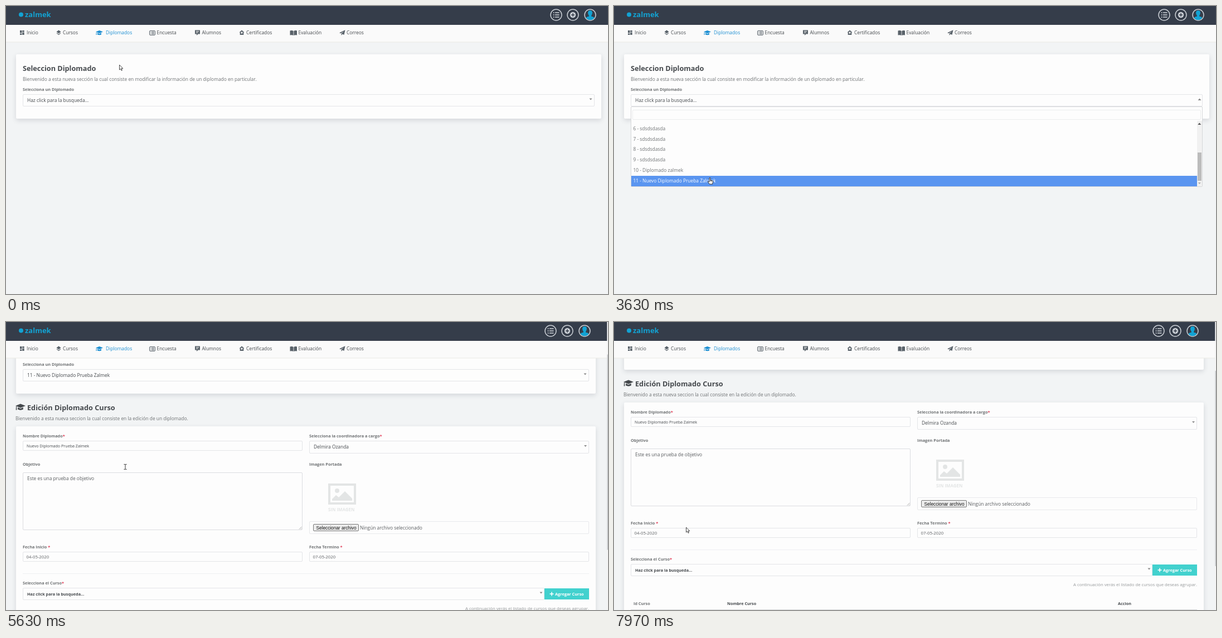
These frames come from a looping animation (1080 by 519 pixels, 8000 ms). An HTML page with a canvas:

```html
<!DOCTYPE html>
<html lang="es">
<head>
<meta charset="utf-8">
<style>
html, body { margin: 0; width: 100%; height: 100%; overflow: hidden; background: #f2f4f5; }
canvas { display: block; width: 100vw; height: 100vh; }
</style>
</head>
<body>
<canvas id="stage" width="1080" height="519"></canvas>
<script>
const c = document.getElementById('stage').getContext('2d');
const LOOP = 8000, OPEN = 1450, CLOSE = 4050, FORM = 4800;
const DARK = '#45494d', GREY = '#6f7274', BLUE = '#1d8fd2', ICON = '#59626a', LINE = '#e4e5e8';
const ROW = 18.8, LIST_TOP = 207, LIST_END = 325;
const PROMPT = 'Haz click para la busqueda...';
const CHOSEN = 'Nuevo Diplomado Prueba Zalmek';
const OPTIONS = [
  PROMPT,
  '1 - Diplomado en Neurobiología del Desarrollo Infantil',
  '2 - Diplomado Compras Públicas',
  '3 - Diplomado en Gestión de Marketing Digital y Métricas',
  '4 - Diplomado en Inclusión para la diversidad en el Aula: Nuevas estrategias y herramientas (DUA)',
  ...[5, 6, 7, 8, 9].map(n => n + ' - sdsdsdasda'),
  '10 - Diplomado zalmek',
  '11 - ' + CHOSEN
];

// Keyframes: [time, value...]
const POINTER = [
  [0, 203, 106], [300, 203, 107], [1100, 190, 168], [1600, 189, 171], [2350, 183.5, 274.5],
  [2600, 183.5, 274.5], [3070, 180, 274], [3270, 180, 274], [3600, 172, 309], [4600, 172, 309],
  [5400, 214, 261], [5700, 214, 261], [6200, 238, 258], [6400, 238, 258], [6830, 179, 334],
  [7000, 179, 334], [7940, 129, 370]
];
const LIST_SCROLL = [[2550, 0], [3050, 108]];
const PAGE_SCROLL = [[5252, 0], [6268, 235], [7000, 235], [7790, 117]];

function at(keys, t) {
  const next = keys.findIndex(k => k[0] > t);
  if (next === 0) return keys[0].slice(1);
  if (next < 0) return keys[keys.length - 1].slice(1);
  const a = keys[next - 1], b = keys[next];
  const p = (t - a[0]) / (b[0] - a[0]), e = p * p * (3 - 2 * p);
  return a.slice(1).map((v, i) => v + (b[i + 1] - v) * e);
}

// y is the middle of the capital letters
function text(s, x, y, size = 8.38, color = GREY, weight = 400, family = '"Open Sans"') {
  c.font = `${weight} ${size}px ${family}, sans-serif`;
  c.fillStyle = color;
  c.fillText(s, x, y + size * 0.36);
  return c.measureText(s).width;
}
function rect(x, y, w, h, color) {
  c.fillStyle = color;
  c.fillRect(x, y, w, h);
}
function box(x, y, w, h, border = LINE, fill = '#fdfdfd') {
  c.beginPath();
  c.roundRect(x + 0.5, y + 0.5, w - 1, h - 1, 1.5);
  c.fillStyle = fill;
  c.fill();
  c.strokeStyle = border;
  c.lineWidth = 1;
  c.stroke();
}
function card(x, y, w, h) {
  c.save();
  c.shadowColor = 'rgba(40,50,70,.15)';
  c.shadowBlur = 9;
  c.shadowOffsetY = 3;
  c.fillStyle = '#fdfdfd';
  c.beginPath();
  c.roundRect(x, y, w, h, 2);
  c.fill();
  c.restore();
}
function shape(d, x, y, fill, stroke, scale = 1, width = 1) {
  c.save();
  c.translate(x, y);
  c.scale(scale, scale);
  const path = new Path2D(d);
  if (fill) { c.fillStyle = fill; c.fill(path); }
  if (stroke) { c.strokeStyle = stroke; c.lineWidth = width; c.stroke(path); }
  c.restore();
}
function disc(x, y, r, fill, stroke, width = 1.5) {
  c.beginPath();
  c.arc(x, y, r, 0, 7);
  if (fill) { c.fillStyle = fill; c.fill(); }
  if (stroke) { c.strokeStyle = stroke; c.lineWidth = width; c.stroke(); }
}
function clip(x, y, w, h, draw) {
  c.save();
  c.beginPath();
  c.rect(x, y, w, h);
  c.clip();
  draw();
  c.restore();
}
function label(s, x, y, required) {
  const w = text(s, x, y, 7.35, GREY, 700);
  if (required) text('*', x + w, y, 7.35, '#e0405a', 700);
}
const caret = (x, y, up, color = '#888') =>
  shape(up ? 'M-3 2L0-1.5L3 2z' : 'M-2.5-1.5L0 1.5L2.5-1.5z', x, y, color);

const CAP = 'M0 3.6L6.5 1L13 3.6L6.5 6.3zM3 5.6V8.4Q6.5 10 10 8.4V5.6L6.5 7.2zM.8 4.4H1.5L1.8 9H.5z';
const NAV = [
  ['Inicio', 37, 'M25 44h3.5v4.6H25zM29.3 44h3.4v2.8h-3.4zM25 49.4h3.5V52H25zM29.3 47.6h3.4V52h-3.4z'],
  ['Cursos', 102, 'M94.5 43.5L98.5 46.5L94.5 49.5L90.5 46.5zM91.3 48.4L94.5 50.7L97.7 48.4L98.5 49L94.5 52.2L90.5 49z'],
  ['Diplomados', 179],
  ['Encuesta', 270.5],
  ['Alumnos', 351.5, 'M339 43.5H348V50.5H344.5L342 53V50.5H339zM341 45.3V46.2H346V45.3zM341 47.5V48.4H344.5V47.5z'],
  ['Certificados', 431, 'M423 43.5L427.5 47.5H426.3V52H419.7V47.5H418.5zM422.2 46.2V47.5H421V48.7H422.2V50H423.6V48.7H425V47.5H423.6V46.2z'],
  ['Evaluación', 524.5, 'M509.5 44.5Q513 43.3 515.6 45V53Q513 51.6 509.5 52.6zM516.4 45Q519 43.3 522 44.5V52.6Q519 51.6 516.4 53z'],
  ['Correos', 611, 'M608.5 43.3L606.5 52L603.5 50.5L601.6 53V49.7L606.5 45.2L600.6 49.2L598 48.3z']
];

function header(shift, edge) {
  rect(0, 0, edge, 34, '#353d4a');
  rect(0, 34, edge, 31, '#fafafa');
  rect(0, 64.5, edge, 1, '#ebebe6');
  disc(27, 15.5, 4, '#12a3d4');
  text('zalmek', 34, 15, 13, '#12a3d4', 700);
  NAV.forEach(([name, x, icon], i) => {
    text(name, x, 48, 8.4, i === 2 ? BLUE : DARK);
    if (icon) {
      c.fillStyle = ICON;
      c.fill(new Path2D(icon), 'evenodd');
    }
  });
  shape(CAP, 161, 43, BLUE);
  box(257, 44, 11, 9, ICON, '#fafafa');
  for (const y of [46, 48, 50]) {
    rect(259, y, 1, 1, ICON);
    rect(261, y, 5, 1, ICON);
  }

  const pale = '#c9ced4';
  for (const x of [987, 1017, 1048]) disc(x - shift, 16, 10, '#353d4a', pale);
  for (const y of [12, 16, 20]) {
    disc(982.6 - shift, y, 1, pale);
    rect(985 - shift, y - 0.8, 7.5, 1.6, pale);
  }
  disc(1017 - shift, 16, 5.2, pale);
  rect(1014 - shift, 15.3, 6, 1.5, '#353d4a');
  rect(1016.3 - shift, 13, 1.5, 6, '#353d4a');
  shape('M0-8C5-8 4.6-2 2.2 1V2.8Q6.8 3.6 7.4 5.6A9.2 9.2 0 0 1-7.4 5.6Q-6.8 3.6-2.2 2.8V1C-4.6-2-5-8 0-8z',
    1048 - shift, 16, '#12a3d4');
}

function selection(right, t) {
  const isOpen = t >= OPEN && t < CLOSE;
  card(18, 87, right - 18, 116);
  text('Seleccion Diplomado', 30, 112, 12.7, DARK, 700);
  text('Bienvenido a esta nueva sección la cual consiste en modificar la información de un diplomado en particular.', 30, 132);
  label('Selecciona un Diplomado', 30, 150);
  box(30, 159, right - 42, 22);
  text(t < CLOSE ? PROMPT : '11 - ' + CHOSEN, 38, 170, 8.38, DARK);
  caret(right - (isOpen ? 17.5 : 19), 168, isOpen);
}

function dropdown(t, pointerY) {
  const [scroll] = at(LIST_SCROLL, t);
  const hover = Math.max(0, Math.floor((pointerY - LIST_TOP + scroll) / ROW));
  const rowTop = i => Math.round(LIST_TOP + i * ROW - scroll);
  box(30, 181, 1026, 145, '#d6d8da');
  box(33, 187, 1020, 18, '#ebeced');
  if (Math.floor((t - 916) / 530) % 2 === 0) rect(36.4, 192, 0.7, 10, '#666');
  clip(31, LIST_TOP, 1024, LIST_END - LIST_TOP, () => {
    OPTIONS.forEach((name, i) => {
      const y = rowTop(i), height = rowTop(i + 1) - y;
      if (i === hover) rect(31, y, 1015, height, '#5a95f0');
      else if (i === 0) rect(31, y, 1015, height, '#dadada');
      text(name, 34.5, LIST_TOP + (i + 0.48) * ROW - scroll, 8.38, i === hover ? '#fff' : GREY);
    });
    rect(1046, LIST_TOP, 9, LIST_END - LIST_TOP, '#f1f1f1');
    rect(1047, Math.round(217 + scroll * 0.435), 7, 51, '#bcbcbc');
    caret(1050.3, 212, true, scroll > 0 ? '#555' : '#aaa');
    caret(1050.3, 319.5, false, scroll < 108 ? '#555' : '#aaa');
  });
}

function form() {
  shape(CAP, 17, 220, DARK, null, 1.38);
  text('Edición Diplomado Curso', 38, 228, 12.7, DARK, 700);
  text('Bienvenido a esta nueva seccion la cual consiste en la edición de un diplomado.', 17, 248);
  card(18, 262, 1040, 700);

  label('Nombre Diplomado', 30, 279.5, true);
  box(30, 288, 502, 18);
  text(CHOSEN, 37, 297, 7.15, DARK);
  label('Selecciona la coordinadora a cargo', 544, 279.5, true);
  box(544, 288, 502, 23);
  text('Delmira Ozanda', 552, 299, 8.38, DARK);
  caret(1039.5, 297.5);

  label('Objetivo', 30, 330);
  box(30, 345, 502, 104, '#dcdde1');
  text('Este es una prueba de objetivo', 38, 355.5, 8.38, '#595c5f');
  shape('M526 447.5L530.5 443M529 447.5L530.5 446', 0, 0, null, '#888', 1, 0.7);
  label('Imagen Portada', 544, 330);
  const pale = '#e3e5e5';
  c.strokeStyle = pale;
  c.lineWidth = 4;
  c.strokeRect(580, 367, 46, 34);
  disc(594, 378, 4, pale);
  shape('M585 396V393L592 386L597 390L608 379L621 392V396z', 0, 0, pale);
  text('SIN IMAGEN', 578, 412, 7.9, pale, 700);
  box(544, 433, 502, 23, '#e8e9ec');
  box(551, 438, 82, 13, '#777', '#ececec');
  text('Seleccionar archivo', 556.5, 444.7, 8.25, '#111', 400, '"Liberation Sans"');
  text('Ningún archivo seleccionado', 635, 445, 8.38, '#595c5f');

  [['Fecha Inicio ', 30, '04-05-2020'], ['Fecha Termino ', 544, '07-05-2020']].forEach(([name, x, date]) => {
    label(name, x, 479, true);
    box(x, 488, 502, 18);
    text(date, x + 6.5, 497, 7.8, '#595c5f');
  });
  rect(30, 527, 1016, 1, '#eeeff2');

  label('Selecciona el Curso', 30, 544, true);
  box(30, 553, 936, 22);
  text(PROMPT, 38, 564.3, 7.25, DARK, 700);
  caret(960, 562);
  rect(966, 554, 80, 20, '#42d1ce');
  rect(975.5, 563.2, 7, 1.6, '#fff');
  rect(978.2, 560.5, 1.6, 7, '#fff');
  text('Agregar Curso', 985, 564.3, 7.35, '#fff', 700);
  c.textAlign = 'right';
  text('A continuación verás el listado de cursos que deseas agrupar.', 1046, 590, 7.75, '#96999b');
  c.textAlign = 'left';

  text('Id Curso', 35, 624.3, 7.25, GREY, 700);
  text('Nombre Curso', 203, 624.3, 7.25, DARK, 700);
  text('Accion', 904, 624.3, 7.25, DARK, 700);
  rect(30, 635, 1016, 1.2, '#d3d5d8');
  ['Normativa Legal y Probidad Administrativa', 'Inducción Corporativa BROVENTAx'].forEach((name, i) => {
    const y = 646.5 + i * 24.7;
    text(i + 1, 35, y, 7.25, GREY, 700);
    text(name, 203, y, 7.25, GREY, 700);
    shape('M0 1H2.3L2.8 0H4.2L4.7 1H7V2H0zM.5 2.7H6.5L6 8.5H1z', 903.7, y - 4.3, '#2c72b8');
  });
  rect(30, 660, 1016, 1, '#e2e4e7');
  rect(30, 718, 1016, 1, '#eaebee');
  rect(960, 729, 86, 21, '#58e096');
  text('Editar Diplomado', 969, 739.5, 8.38, '#fff');
}

function pointer(t, x, y) {
  if (t > OPEN && t < CLOSE && y > LIST_TOP) {
    shape('M-1 1Q0-.6 1 1V5L5 6Q6 6.5 5.6 8L4.5 12H-.5L-3.5 8Q-3.6 6.5-2.4 7L-1 8.2zM1.2 5V7M3 5.6V7.3', x, y, '#fff', '#222', 1, 0.9);
  } else if (t > 5250 && t < 6600) {
    shape('M-2.5-4.5H-.6L0-4L.6-4.5H2.5M0-4V4M-2.5 4.5H-.6L0 4L.6 4.5H2.5', x, y, null, '#333');
  } else {
    shape('M.5 0V9L2.6 7.1L4.1 10.4L5.4 9.8L4 6.6H6.8z', x, y, '#fff', '#333', 1, 0.9);
  }
}

function draw(now) {
  const t = now % LOOP;
  const hasForm = t >= FORM;
  const scroll = Math.round(at(PAGE_SCROLL, t)[0]);
  const [x, y] = at(POINTER, t);
  rect(0, 0, 1080, 519, '#f2f4f5');
  c.save();
  c.translate(0, -scroll);
  selection(hasForm ? 1058 : 1068, t);
  if (hasForm) form();
  c.restore();
  if (t >= OPEN && t < CLOSE) dropdown(t, y);
  header(hasForm ? 10 : 0, hasForm ? 1078.5 : 1080);
  if (hasForm) {
    rect(1078.5, 0, 1.5, 519, '#f4f4f4');
    rect(1078.5, 8 + scroll * 0.683, 1.5, 352, '#c4c6c8');
  }
  pointer(t, x, y);
}

const start = performance.now();
function tick() {
  draw(performance.now() - start);
  requestAnimationFrame(tick);
}
tick();
</script>
</body>
</html>
```
